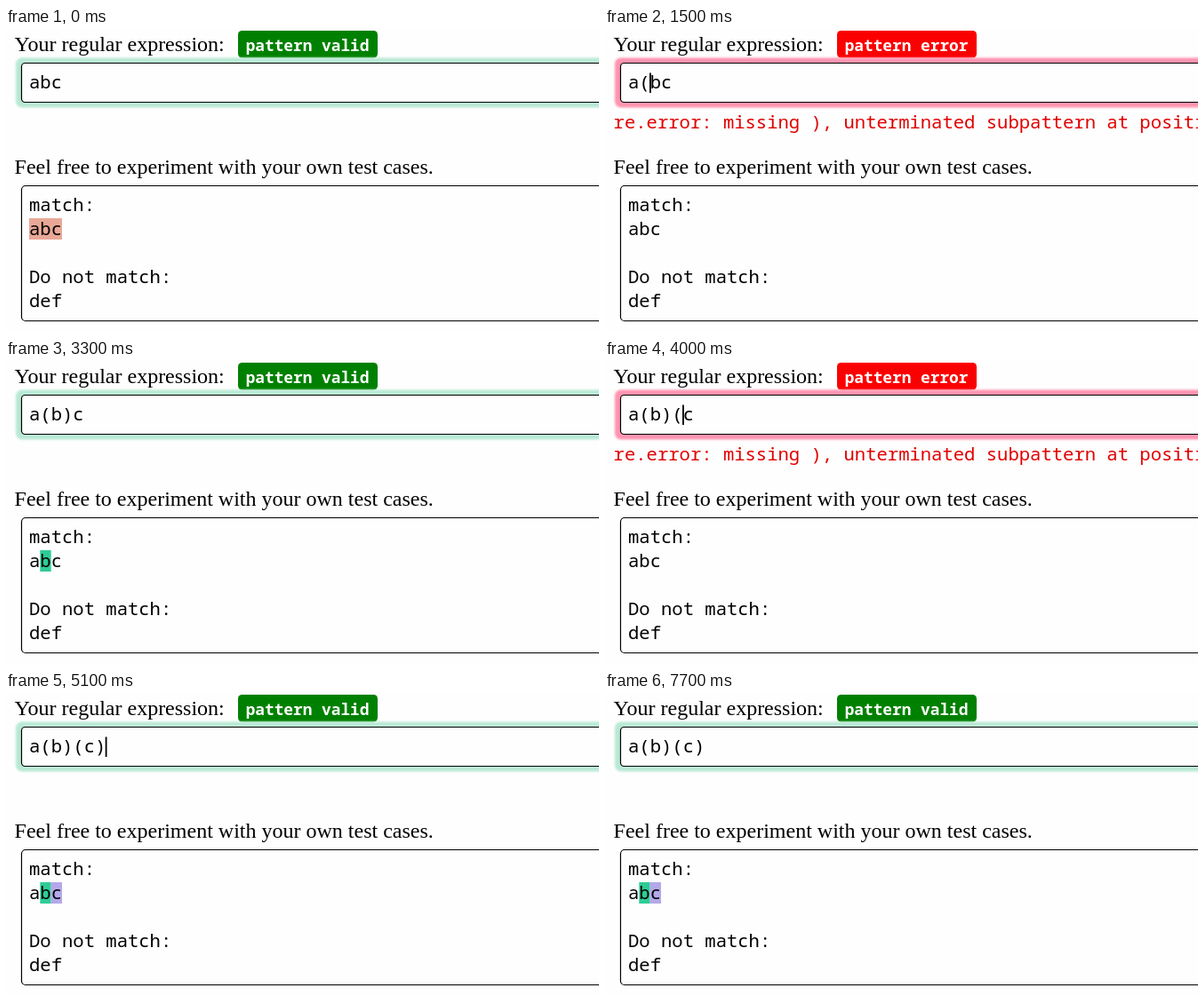
Recreate the animation shown at these times as an HTML page. Size 667 px wide and 342 px high, loop 7.9 s.

```html
<!DOCTYPE html>
<html lang="en">
<head>
<meta charset="utf-8">
<title>Regular expression tester</title>
<style>
html, body { margin: 0; width: 100%; height: 100%; overflow: hidden; background: #fefefe; }
svg { display: block; width: 667px; height: 342px; }
text { white-space: pre; }
.prose { font: 24px "Liberation Serif", "Times New Roman", serif; }
.mono { font: 20.55px "Noto Sans Mono", monospace; }
.badge { font: 600 17.8px "Noto Sans Mono", monospace; fill: #fff; }
.box { fill: #fefefe; stroke: #000; stroke-width: 1.2; }
</style>
</head>
<body>
<svg viewBox="0 0 667 342">
  <defs>
    <filter id="soft" filterUnits="userSpaceOnUse" x="0" y="20" width="720" height="85">
      <feGaussianBlur stdDeviation="1.3"/>
    </filter>
  </defs>
  <text class="prose" x="9.6" y="26">Your regular expression:</text>
  <rect id="badge" x="261" y="3" width="157" height="30.5" rx="4.5"/>
  <text id="label" class="badge" x="269.7" y="26"></text>
  <rect id="glow" x="11" y="33.5" width="700" height="56" rx="7" filter="url(#soft)"/>
  <rect class="box" x="17.5" y="39.5" width="700" height="44" rx="4"/>
  <text id="input" class="mono" x="26" y="68"></text>
  <rect id="caret" y="50.5" width="1.8" height="22.5"/>
  <text id="error" class="mono" x="9.6" y="113" fill="#e00000"></text>
  <text class="prose" x="9.6" y="164">Feel free to experiment with your own test cases.</text>
  <rect class="box" x="17.5" y="177.5" width="700" height="152" rx="4.5"/>
  <g id="marks"></g>
  <g class="mono">
    <text x="26" y="206">match:</text>
    <text x="26" y="233">abc</text>
    <text x="26" y="287">Do not match:</text>
    <text x="26" y="314">def</text>
  </g>
</svg>
<script>
const LOOP = 7900, LEFT = 26, CHAR = 12.33;
const WHOLE = "#e9a897", GROUPS = ["#2ecc95", "#b5a8ea"];
const $ = id => document.getElementById(id);

// [start ms, pattern, caret column or -1 while blinked off]
const steps = [
  [0, "abc", -1], [700, "abc", 1], [1200, "abc", -1],
  [1500, "a(bc", 2], [1900, "a(bc", 3], [2500, "a(bc", -1],
  [2800, "a(b)c", 4], [3300, "a(b)c", -1], [3800, "a(b)c", 4],
  [4000, "a(b)(c", 5], [4500, "a(b)(c", -1], [5000, "a(b)(c", 6],
  [5100, "a(b)(c)", 7], [5600, "a(b)(c)", -1], [6100, "a(b)(c)", 7],
  [6700, "a(b)(c)", -1], [7200, "a(b)(c)", 7], [7700, "a(b)(c)", -1]
];

function mark(column, length, color) {
  return `<rect x="${LEFT + column * CHAR}" y="214" width="${length * CHAR}" height="24" fill="${color}"/>`;
}

function marksFor(pattern) {
  const groups = pattern.match(/\(\w\)/g);
  if (!groups) return mark(0, 3, WHOLE);
  return groups.map((g, i) => mark("abc".indexOf(g[1]), 1, GROUPS[i])).join("");
}

function show([, pattern, column]) {
  const valid = pattern.split("(").length === pattern.split(")").length;
  $("badge").setAttribute("fill", valid ? "#008000" : "#fb0000");
  $("label").textContent = valid ? "pattern valid" : "pattern error";
  $("glow").setAttribute("fill", valid ? "#b9e9d5" : "#ff94b0");
  $("input").textContent = pattern;
  $("caret").setAttribute("x", LEFT + column * CHAR - 0.6);
  $("caret").setAttribute("visibility", column < 0 ? "hidden" : "visible");
  $("error").textContent = valid ? "" :
    `re.error: missing ), unterminated subpattern at position ${pattern.lastIndexOf("(")}`;
  $("marks").innerHTML = valid ? marksFor(pattern) : "";
}

let current;
const origin = performance.now();
function tick() {
  const t = (performance.now() - origin) % LOOP;
  const step = steps.findLast(s => s[0] <= t);
  if (step !== current) show(current = step);
  requestAnimationFrame(tick);
}
tick();
</script>
</body>
</html>
```
